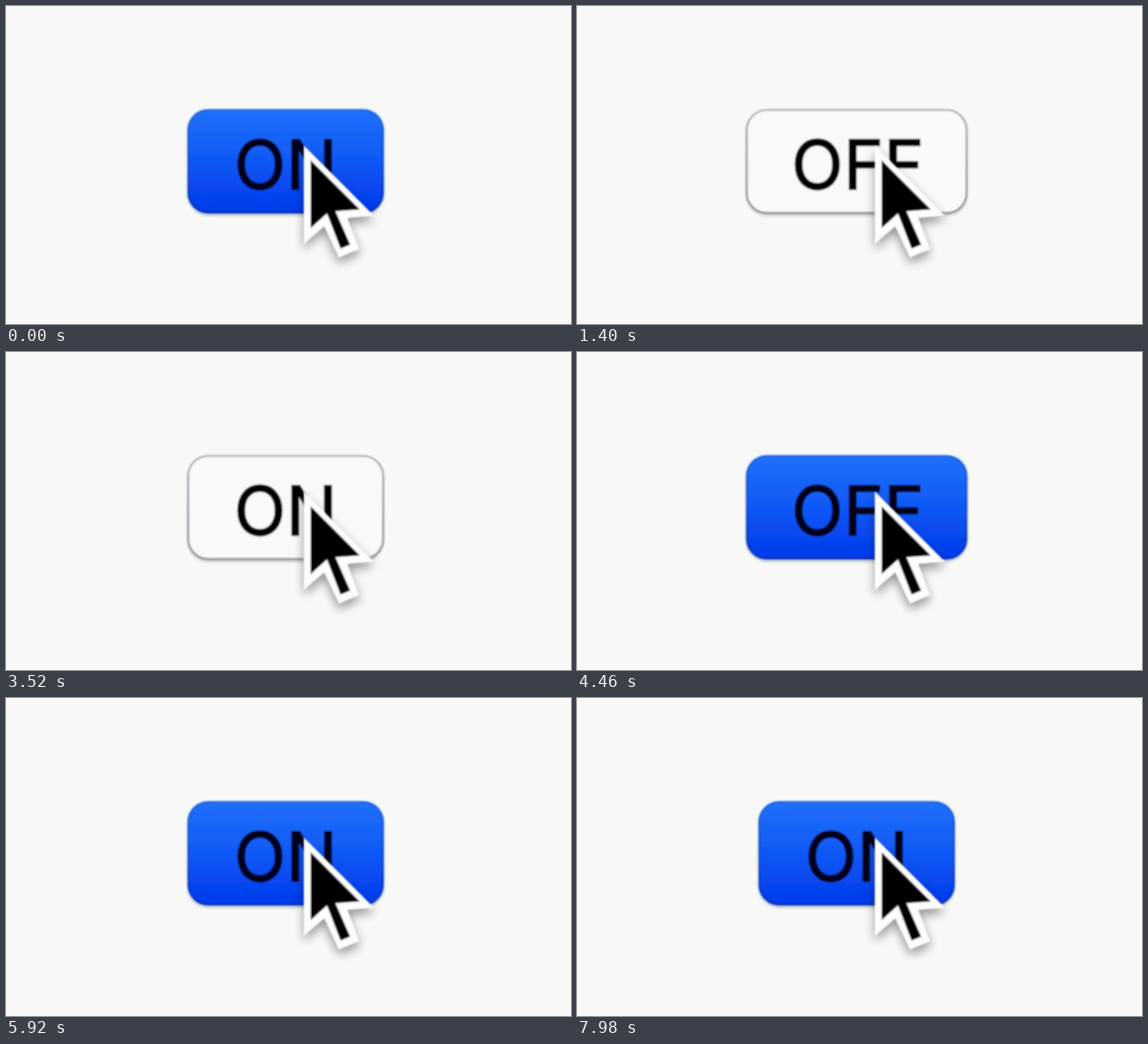
An HTML page for the animation above (8000 ms loop, 998 px wide and 561 px high).

```html
<!DOCTYPE html>
<html lang="en">
<head>
<meta charset="utf-8">
<title>Toggle button</title>
<style>
  html, body { margin: 0; width: 100%; height: 100%; overflow: hidden; background: #f8f8f7; }
  svg { display: block; width: 100vw; height: 100vh; }
  text { font: 400 119px Inter, Roboto, sans-serif; letter-spacing: 1px; stroke-width: 3; }
</style>
</head>
<body>
<svg viewBox="0 0 998 561">
  <defs>
    <linearGradient id="blue" x2="0" y2="1">
      <stop offset="0" stop-color="#2070fb"/>
      <stop offset=".5" stop-color="#0f58f6"/>
      <stop offset="1" stop-color="#0039ea"/>
    </linearGradient>
    <linearGradient id="rim" x2="0" y2="1">
      <stop offset="0" stop-color="#1e62dc"/>
      <stop offset="1" stop-color="#0a2cb4"/>
    </linearGradient>
    <linearGradient id="gray" x2="0" y2="1">
      <stop offset="0" stop-color="#b4b3b9"/>
      <stop offset="1" stop-color="#98979d"/>
    </linearGradient>
    <filter id="soft"><feGaussianBlur stdDeviation="1.5"/></filter>
    <filter id="shade" x="-30%" y="-30%" width="160%" height="160%"><feGaussianBlur stdDeviation="9"/></filter>
    <filter id="low" x="-10%" y="-10%" width="120%" height="130%"><feGaussianBlur stdDeviation="3"/></filter>
    <path id="outer" d="M526 246L650 370L603 374L624 429L588 444L562 389L526 420Z"/>
  </defs>
  <rect width="998" height="561" fill="#f8f8f7"/>
  <rect class="box" y="187" height="182" rx="36" fill="#000" opacity=".28" filter="url(#low)"/>
  <g filter="url(#soft)">
    <rect id="halo" class="box" y="183.5" height="181.5" rx="35" fill="none" stroke="#c4f3ff" stroke-width="7"/>
    <rect id="face" class="box" y="183.5" height="181.5" rx="35" stroke-width="3.6"/>
    <text id="label" y="322.5"></text>
  </g>
  <use href="#outer" y="9" opacity=".4" filter="url(#shade)"/>
  <g filter="url(#soft)">
    <use href="#outer" fill="#fdfdfd"/>
    <path d="M538 272L625 359L582 362L608 421L591 428L567 366L538 392Z"/>
  </g>
</svg>
<script>
const LOOP = 8000;
// Each press flips the label; the face stays blue until release.
const presses = [
  [0, 420], [820, 1240], [1520, 1840], [2120, 2640], [3060, 3500],
  [4220, 4760], [5500, 6040], [6620, 7160], [7700, LOOP]
];
const looks = {
  ON: { x: 322, width: 344, textX: 403 },
  OFF: { x: 300, width: 388, textX: 379 }
};
const $ = id => document.getElementById(id);
const boxes = document.querySelectorAll('.box');
const set = (el, attrs) => {
  for (const key in attrs) el.setAttribute(key, attrs[key]);
};

function draw(time) {
  const count = presses.filter(([down]) => down <= time).length;
  const pressed = time < presses[count - 1][1];
  const name = count % 2 ? 'ON' : 'OFF';
  const { x, width, textX } = looks[name];
  const ink = pressed ? '#00061c' : '#000';
  boxes.forEach(box => set(box, { x, width }));
  set($('halo'), { opacity: pressed ? 0.7 : 0 });
  set($('face'), {
    fill: pressed ? 'url(#blue)' : '#f9f9f9',
    stroke: pressed ? 'url(#rim)' : 'url(#gray)'
  });
  set($('label'), { x: textX, fill: ink, stroke: ink });
  $('label').textContent = name;
}

const start = performance.now();
function tick() {
  draw((performance.now() - start) % LOOP);
  requestAnimationFrame(tick);
}
tick();
</script>
</body>
</html>
```
